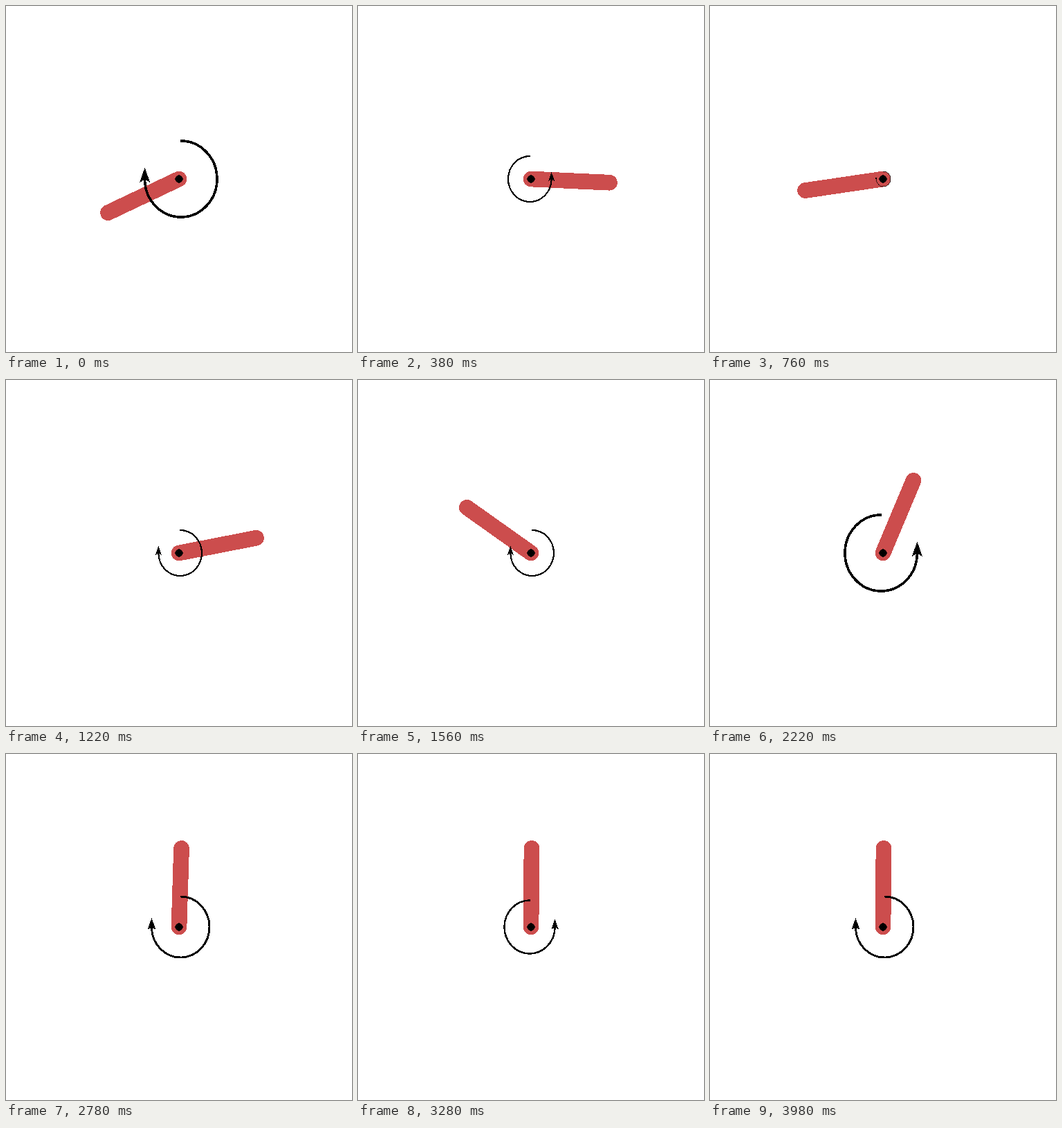
An HTML page that plays this animation: 500 by 500 pixels, repeating every 4000 ms.

```html
<!DOCTYPE html>
<html lang="en">
<head>
<meta charset="utf-8">
<title>Pendulum swing-up</title>
<style>
  html, body { margin: 0; width: 100%; height: 100%; overflow: hidden; background: #fff; }
  svg { display: block; width: 100%; height: 100%; shape-rendering: crispEdges; }
</style>
</head>
<body>
<svg viewBox="-250 -250 500 500">
  <line id="rod" y2="-113.6" stroke="#cc4d4d" stroke-width="22.7" stroke-linecap="round"/>
  <circle r="5.7"/>
  <g id="torque">
    <path d="M2 -55 H2.8 A52.2 55 0 1 1 -49.4 2 V-2" fill="none" stroke="#000" stroke-width="3.6"/>
    <path d="M-49.4 -16.5 L-41.8 5 L-49.4 0.5 L-57 5 Z"/>
  </g>
</svg>
<script>
const STEP = 20, COUNT = 200;
const REST = 179.54, DECAY = 0.102, BALANCE = 122;

// Ends of the swings; angle in degrees from hanging, torque of the swing that leads there
const turns = [
  { at: 0, angle: -64.6, torque: -2 },
  { at: 20, angle: 88, torque: 1.2 },
  { at: 39, angle: -82.4, torque: -0.4 },
  { at: 59, angle: 104, torque: 2 },
  { at: 82.5, angle: -141.5, torque: -1.2 },
  { at: 108.5, angle: 150.8, torque: 0.8 }
];

const rod = document.getElementById("rod");
const torque = document.getElementById("torque");

// Half a pendulum period: a cosine with slightly flattened ends
function swingEase(s) {
  const x = Math.PI * s, flat = 0.04;
  return (1 - (Math.cos(x) - flat * Math.cos(3 * x)) / (1 - flat)) / 2;
}

function angleAt(n) {
  const i = turns.findIndex(turn => turn.at > n);
  if (i > 0) {
    const from = turns[i - 1], to = turns[i];
    const s = (n - from.at) / (to.at - from.at);
    return from.angle + (to.angle - from.angle) * swingEase(s);
  }
  const last = turns[turns.length - 1];
  const shake = n % 2 ? -0.05 : 0.05;
  return REST + shake - (REST - last.angle) * Math.exp(DECAY * (last.at - n));
}

function torqueAt(n) {
  if (n >= BALANCE) return n % 2 ? -1.6 : 1.4;
  const next = turns.find(turn => turn.at >= n);
  return next ? next.torque : 2;
}

function draw(n) {
  const u = torqueAt(n);
  rod.setAttribute("transform", `rotate(${180 - angleAt(n)})`);
  torque.setAttribute("transform", `scale(${-u / 2} ${Math.abs(u) / 2})`);
}

const start = performance.now();
function tick() {
  draw(Math.floor((performance.now() - start) / STEP) % COUNT);
  requestAnimationFrame(tick);
}
tick();
</script>
</body>
</html>
```
